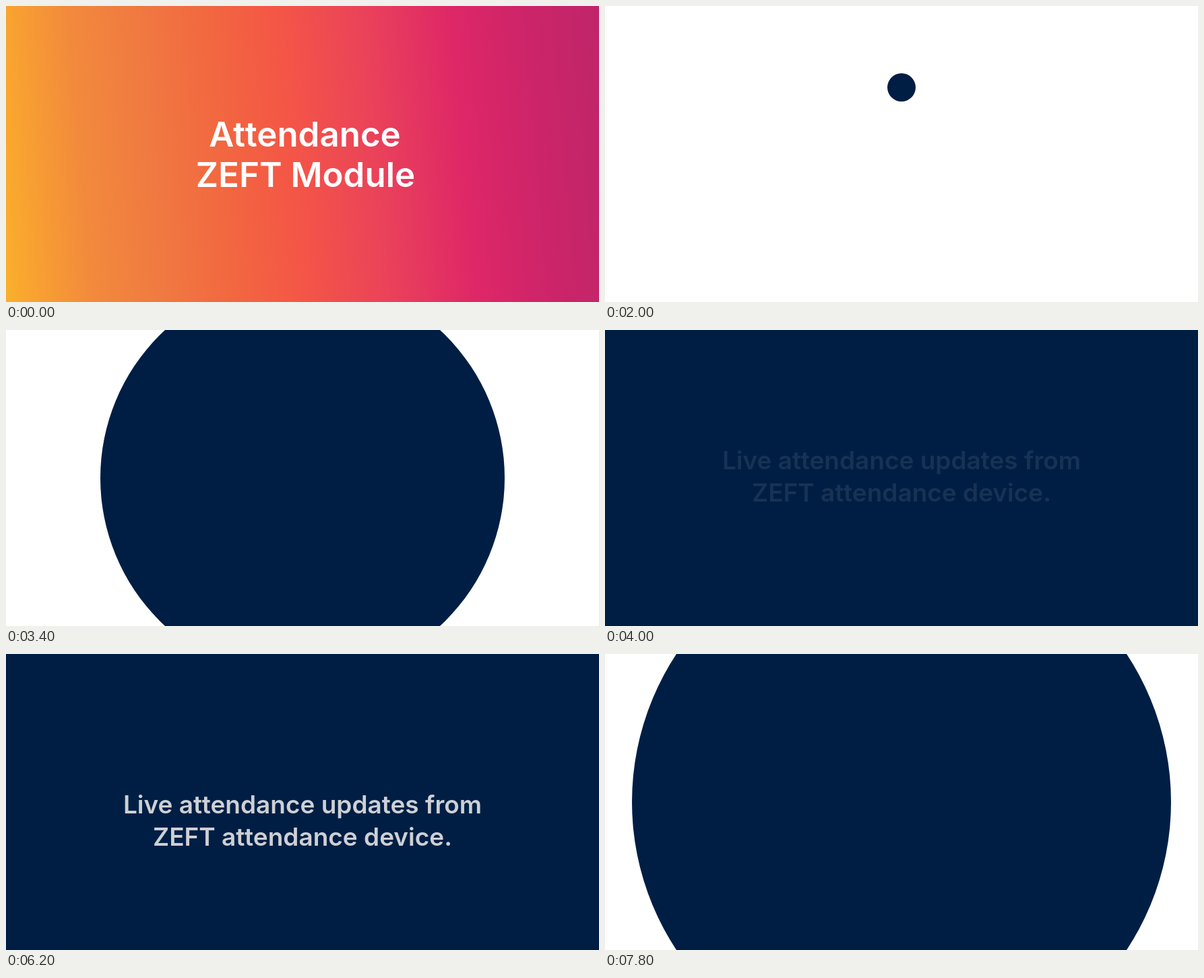
An HTML page for the animation above (8000 ms loop, 880 px wide and 440 px high).

```html
<!DOCTYPE html>
<html lang="en">
<head>
<meta charset="utf-8">
<title>Attendance module</title>
<style>
  html, body { margin: 0; width: 100%; height: 100%; overflow: hidden; background: #fff; }
  .stage { position: relative; width: 880px; height: 440px; overflow: hidden; }
  .intro {
    position: absolute; inset: 0;
    background: linear-gradient(85deg, #f9b02c 0%, #f9a430 4%, #f28a3c 14%, #f07a41 25%,
      #f26740 37%, #f45646 48%, #ea425a 62%, #de2767 76%, #cd2469 88%, #bf2669 100%);
    animation: intro 8s infinite step-end;
  }
  svg { position: absolute; inset: 0; width: 880px; height: 440px; }
  text { font-family: Inter, "Open Sans", sans-serif; font-weight: 600; text-anchor: middle; }
  .title { font-size: 51px; fill: #fff; animation: intro 8s infinite step-end; }
  .dot { cx: 440px; fill: #001e44; animation: dot 8s infinite; }
  .note { font-size: 37px; fill: #e8e8e8; animation: note 8s infinite; }

  @keyframes intro {
    0% { visibility: visible; }
    15%, 100% { visibility: hidden; }
  }

  /* The dot drops in, then swells until it fills the stage. */
  @keyframes dot {
    0% { cy: 21px; r: 0px; animation-timing-function: step-end; }
    15% { cy: 21px; r: 21px; animation-timing-function: steps(8); }
    35% { cy: 221px; r: 21px; animation-timing-function: step-end; }
    37.5% { cy: 220px; r: 100px; animation-timing-function: steps(4); }
    47.5% { cy: 220px; r: 500px; animation-timing-function: step-end; }
    97.5%, 100% { cy: 220px; r: 400px; animation-timing-function: step-end; }
  }

  /* The note fades in, then sinks while fading out. */
  @keyframes note {
    0% { opacity: 0; transform: translateY(0); animation-timing-function: step-end; }
    50% { opacity: .1; transform: translateY(0); animation-timing-function: steps(9); }
    72.5% { opacity: 1; transform: translateY(0); animation-timing-function: step-end; }
    75% { opacity: 1; transform: translateY(12.5px); animation-timing-function: steps(9); }
    97.5%, 100% { opacity: 0; transform: translateY(170px); animation-timing-function: step-end; }
  }
</style>
</head>
<body>
<div class="stage">
  <div class="intro"></div>
  <svg viewBox="0 0 880 440">
    <g class="title">
      <text x="443.5" y="209">Attendance</text>
      <text x="444.5" y="269">ZEFT Module</text>
    </g>
    <circle class="dot"/>
    <g class="note">
      <text x="440" y="207">Live attendance updates from</text>
      <text x="440" y="255">ZEFT attendance device.</text>
    </g>
  </svg>
</div>
</body>
</html>
```
